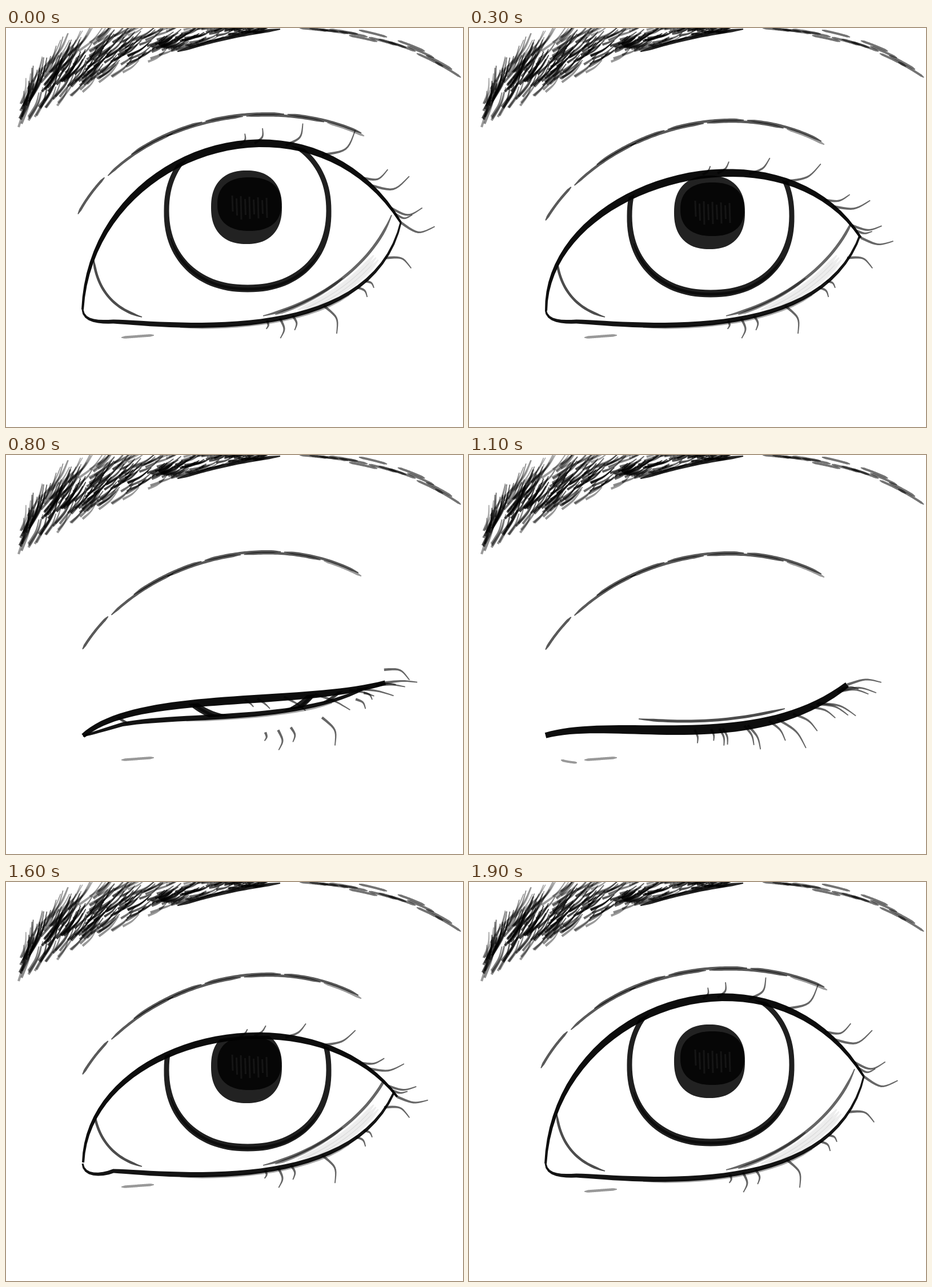
Write an HTML page with a canvas that moves like this. It is 800 px wide and 700 px high and loops after 2 s.

```html
<!DOCTYPE html>
<html lang="en">
<head>
<meta charset="utf-8">
<title>Blinking eye</title>
<style>
html, body { margin: 0; width: 100%; height: 100%; overflow: hidden; background: #fff; }
canvas { display: block; }
</style>
</head>
<body>
<canvas id="stage" width="800" height="700"></canvas>
<script>
const ctx = document.getElementById('stage').getContext('2d');
const { PI, sin, cos, min, max, abs, sign, floor, hypot } = Math;

// Each key: pose, then the control points of one cubic
const lidKeys = [
  [0, [134, 494], [149, 209], [534, 86], [691, 341]],
  [3, [135, 496], [134, 274], [546, 150], [686, 368]],
  [4, [135, 492], [144, 269], [539, 184], [685, 377]],
  [6, [137, 494], [152, 321], [536, 268], [668, 392]],
  [9, [134, 492], [259, 457], [498, 531], [662, 403]]
];
const foldKeys = [
  [0, [126, 328], [216, 158], [464, 110], [627, 188]],
  [3, [134, 339], [222, 189], [453, 109], [622, 203]],
  [4, [134, 339], [222, 189], [453, 109], [622, 203]],
  [9, [134, 343], [222, 196], [453, 121], [622, 213]]
];
// Lid width at the ends, extra width in the middle
const widthKeys = [[0, [4, 10]], [3, [4, 10]], [6, [4, 4]], [9, [10, 7]]];
// Upper lashes: first angle, last angle, length scale, bend
const lashKeys = [[0, [-66, 7, 1, .2]], [3, [-48, 6, .95, .13]], [6, [-35, 6, .8, .08]], [9, [78, -4, 1, -.1]]];
// Place along the lid and length
const upperLashes = [[.57, 21], [.605, 30], [.68, 48], [.77, 72], [.875, 48], [.9, 70], [.965, 55], [.98, 30], [1, 60]];
const lowerLashes = [[.5, 15], [.535, 35], [.57, 26], [.66, 54], [.77, 24], [.8, 19], [.89, 48]];

const mix = (a, b, k) => a + (b - a) * k;
const mixPts = (a, b, k) => a.map((p, i) => p.map((v, j) => mix(v, b[i][j], k)));
const move = (pts, dx, dy) => pts.map(([x, y]) => [x + dx, y + dy]);

function at(keys, pose) {
  let i = 0;
  while (i < keys.length - 2 && pose > keys[i + 1][0]) i++;
  const [p, ...a] = keys[i], [q, ...b] = keys[i + 1];
  return mixPts(a, b, (pose - p) / (q - p));
}

function point([a, b, c, d], t) {
  const s = 1 - t;
  return [0, 1].map(j => s * s * s * a[j] + 3 * s * s * t * b[j] + 3 * s * t * t * c[j] + t * t * t * d[j]);
}

function cubic(ctrl, from = 0, to = 1, n = 32) {
  return Array.from({ length: n + 1 }, (_, i) => point(ctrl, mix(from, to, i / n)));
}

function trace(pts) {
  ctx.beginPath();
  pts.forEach(([x, y]) => ctx.lineTo(x, y));
  ctx.closePath();
}

const taper = w => t => w * min(1, .35 + 6 * min(t, 1 - t));

// Fills a ribbon whose width depends on the place along it
function brush(pts, width, alpha) {
  const left = [], right = [], last = pts.length - 1;
  const wide = typeof width === 'number' ? taper(width) : width;
  pts.forEach(([x, y], i) => {
    const a = pts[max(0, i - 1)], b = pts[min(last, i + 1)];
    const dx = b[0] - a[0], dy = b[1] - a[1], h = wide(i / last) / 2 / (hypot(dx, dy) || 1);
    left.push([x - dy * h, y + dx * h]);
    right.unshift([x + dy * h, y - dx * h]);
  });
  trace(left.concat(right));
  ctx.fillStyle = `rgba(0,0,0,${alpha})`;
  ctx.fill();
}

// One hair from its root, bent sideways in the middle
function hair([x, y], degrees, len, bend, width, alpha) {
  const a = degrees * PI / 180, dx = cos(a) * len, dy = sin(a) * len;
  const mid = [x + dx * .55 - dy * bend * 1.5, y + dy * .55 + dx * bend * 1.5];
  brush(cubic([[x, y], mid, mid, [x + dx, y + dy]], 0, 1, 10), t => width * (1 - .6 * t), alpha);
}

function clipTo(pts, draw) {
  ctx.save();
  trace(pts);
  ctx.clip();
  draw();
  ctx.restore();
}

function randomFrom(seed) {
  return () => (seed = (seed * 16807) % 2147483647) / 2147483647;
}

function oval(x, y, rx, ry, power) {
  const e = 2 / power;
  return Array.from({ length: 121 }, (_, i) => {
    const a = i * PI / 60 - PI / 2, c = cos(a), s = sin(a);
    return [x + rx * sign(c) * abs(c) ** e, y + ry * sign(s) * abs(s) ** e];
  });
}

function drawBrow() {
  const rnd = randomFrom(4217);
  const edge = [[22, 174], [130, 120], [250, 30], [480, 2]];
  for (let i = 0; i < 300; i++) {
    const t = rnd() * .95, u = rnd(), [x, y] = point(edge, t);
    const height = min(35 + 500 * t, 85, 140 * (1 - t));
    const angle = 76 - 68 * t ** .75 + rnd() * 12 - 6;
    const len = (42 + 36 * rnd()) * (1 - .7 * t);
    hair([x, y - u * height], -angle, len, .06, 4.2, .35 + .4 * (1 - abs(2 * u - .9)));
  }
  brush(cubic(edge, .7, 1), 6, .85);

  const tail = [[514, 0], [612, 8], [712, 28], [798, 88]];
  for (let i = 0; i < 15; i++) {
    const t = i / 17, spread = 18 * sin(PI * t);
    brush(move(cubic(tail, t, t + .17), 0, (rnd() - .65) * spread), 4, .55);
  }
}

function drawFold(pose) {
  const fold = at(foldKeys, pose);
  for (let i = 0; i < 8; i++) {
    const from = i * .125 + (i === 1 ? .03 : 0);
    const part = cubic(fold, from, min(1, from + (i ? .24 : .14)));
    brush(move(part, 0, i % 2 ? 1.5 : -1.5), 4.5, i < 7 ? .65 : .4);
  }
}

function fillShape(pts, color) {
  trace(pts);
  ctx.fillStyle = color;
  ctx.fill();
}

function drawPupil() {
  fillShape(oval(421, 314.5, 62, 64.5, 2.35), '#222');
  fillShape(oval(426, 309, 56, 47, 2.35), '#060606');
  ctx.strokeStyle = '#151515';
  ctx.lineWidth = 3;
  ctx.beginPath();
  for (let i = 0; i < 9; i++) {
    const x = 396 + i * 7.5;
    ctx.moveTo(x, 294 + i * 5 % 9);
    ctx.lineTo(x + 1, 322 + i * 7 % 15);
  }
  ctx.stroke();
}

function drawEyeball(irisDy, lowDy) {
  ctx.save();
  ctx.translate(0, irisDy);
  drawPupil();
  const iris = oval(423, 321, 142, 136, 2.2);
  brush(iris, t => 9 + 4 * max(0, -cos(2 * PI * t)), .88);
  brush(move(iris.slice(40, 85), 1, 1), 5, .6);
  ctx.restore();

  ctx.save();
  ctx.translate(0, lowDy);
  brush(cubic([[153, 403], [158, 455], [185, 492], [238, 507]]), 4.5, .7);
  const rim = [[450, 505], [540, 485], [640, 420], [675, 328]];
  brush(cubic(rim), 5, .6);
  brush(move(cubic(rim, .1, .55), -6, 5), 5, .45);
  for (let i = 0; i < 3; i++) brush(move(cubic(rim, .2, .75), 6 + 4 * i, 7 + 4 * i), 7, .07);
  ctx.restore();
}

function lowerLid(lift) {
  const inner = cubic([[134, 494], [136, 516], [165, 516], [188, 515 + lift]], 0, 1, 8);
  const outer = [[188, 515], [284, 519], [641, 565], [692, 338]].map(([x, y]) => [x, y + lift]);
  return { outer, line: inner.concat(cubic(outer, 0, 1, 31).slice(1)) };
}

function drawUpperLashes(pose, lid) {
  const [[first, last, scale, bend]] = at(lashKeys, pose);
  const lash = (t, len) => {
    const k = max(0, (t - .57) / .43);
    hair(point(lid, t), mix(first, last, k ** 1.2), len * scale, bend, 4.5, .6);
  };
  upperLashes.forEach(([t, len]) => lash(t, len));
  if (pose === 9) for (let i = 0; i < 7; i++) lash(.52 + i * .075, 24 + i * 7);
}

function draw(pose) {
  const shut = max(0, (pose - 6) / 3), closed = shut === 1;
  const lift = pose < 4 ? 0 : -8;
  const lowDy = lift - 28 * shut;
  const lid = at(lidKeys, pose), lidLine = cubic(lid, 0, 1, 39);
  const { outer, line } = lowerLid(lift);
  const lowLine = mixPts(line, lidLine, shut);
  const [[ends, bulge]] = at(widthKeys, pose);

  ctx.fillStyle = '#fff';
  ctx.fillRect(0, 0, 800, 700);
  drawBrow();
  drawFold(pose);

  if (!closed) {
    clipTo(lidLine.concat([...lowLine].reverse()), () => drawEyeball(9 * min(1, pose), lowDy));
    clipTo(lidLine.concat([[800, lid[3][1]], [800, 700], [0, 700], [0, lid[0][1]]]), () => {
      brush(lowLine, t => 3 + 6 * sin(PI * t ** .9), .92);
      brush(move(lowLine.slice(16, 32), 0, 4), 5, .35);
    });
    lowerLashes.forEach(([t, len]) => {
      const [x, y] = point(outer, t);
      hair([x - 3 * min(1, pose), y - 28 * shut], 95 - 187 * (t - .5), len, -.18, 4.5, .6);
    });
  }

  drawUpperLashes(pose, lid);
  brush(lidLine, t => ends + bulge * sin(PI * t ** 1.15), .95);

  if (closed) {
    brush(cubic([[297, 463], [390, 472], [470, 466], [553, 445]]), 5, .7);
    brush(cubic([[161, 535], [170, 538], [180, 539], [189, 540]]), 4, .4);
  }
  brush(cubic([[202, 543], [220, 542], [240, 540], [259, 539]].map(([x, y]) => [x, y + lift])), 4.5, .4);
}

// Close, rest, open again; the last step is already wide open
function poseAt(ms) {
  const step = floor(ms % 2000 / 100);
  return step === 19 ? 0 : min(step, 9, 20 - step);
}

let start, shown;
function tick(now) {
  start ??= now;
  const pose = poseAt(now - start);
  if (pose !== shown) draw(shown = pose);
  requestAnimationFrame(tick);
}
requestAnimationFrame(tick);
</script>
</body>
</html>
```
